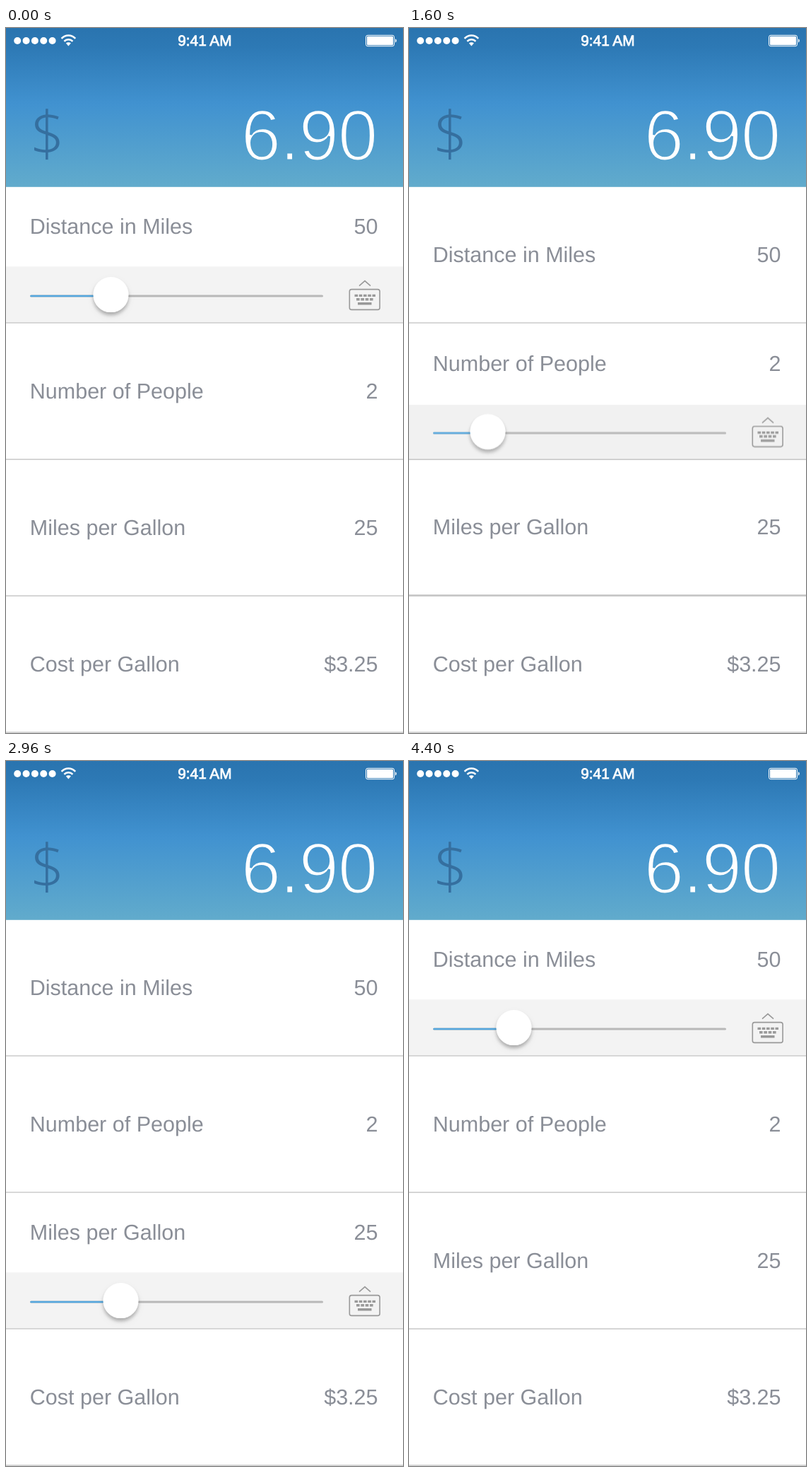
Write an HTML page that moves like this. It is 562 px wide and 997 px high and loops after 4.44 s.

```html
<!DOCTYPE html>
<html lang="en">
<head>
<meta charset="utf-8">
<title>Trip cost calculator</title>
<style>
  html, body { margin: 0; width: 100%; height: 100%; overflow: hidden; background: #fff; }
  svg { display: block; width: 100vw; height: 100vh; }
  text { font-family: "Liberation Sans", Arial, sans-serif; text-rendering: geometricPrecision; }
  .label { font-size: 30.5px; fill: #8a8e97; }
  .end { text-anchor: end; }
  .time { font-size: 20.8px; fill: #fff; stroke: #fff; stroke-width: .8; text-anchor: middle; }
  .total { font-size: 102px; letter-spacing: -1.5px; fill: #fff; stroke: url(#sky); stroke-width: 3; }
  .currency { font-family: "Open Sans", sans-serif; font-weight: 300; font-size: 88px; fill: #356f9f; text-anchor: middle; }
</style>
</head>
<body>
<svg viewBox="0 0 562 997" preserveAspectRatio="none">
  <defs>
    <linearGradient id="sky" gradientUnits="userSpaceOnUse" x1="0" y1="0" x2="0" y2="224">
      <stop offset="0" stop-color="#2a74af"/>
      <stop offset=".12" stop-color="#2d79b5"/>
      <stop offset=".48" stop-color="#4192d0"/>
      <stop offset="1" stop-color="#61abcc"/>
    </linearGradient>
    <filter id="shade" x="-50%" y="-50%" width="200%" height="200%">
      <feDropShadow dx="0" dy="4" stdDeviation="2.5" flood-color="#000" flood-opacity=".26"/>
      <feDropShadow dx="0" dy="4" stdDeviation="5" flood-color="#000" flood-opacity=".06"/>
    </filter>
    <g id="keyboard" fill="none" stroke="#999" stroke-width="1.6">
      <path d="M500 139.8l8-7 8 7"/>
      <rect x="486.3" y="144.8" width="42.8" height="28.8" rx="3"/>
      <g stroke-width="3.4">
        <path d="M493.5 153.6h29.5" stroke-dasharray="4.6 1.65"/>
        <path d="M496 159h23.6" stroke-dasharray="4.6 1.75"/>
        <path d="M498 165h19.5"/>
      </g>
    </g>
  </defs>
  <rect width="562" height="997" fill="#fff"/>
  <g id="rows"></g>
  <rect width="562" height="224.8" fill="url(#sky)"/>
  <g id="signal" fill="#fff"></g>
  <g fill="none" stroke="#fff" stroke-width="2.6">
    <path d="M78.6 14.8a13.4 13.4 0 0 1 19.6 0"/>
    <path d="M82.4 18.8a8.2 8.2 0 0 1 12 0"/>
  </g>
  <path d="M84.9 21.6a5 5 0 0 1 7 0l-3.5 3.9z" fill="#fff"/>
  <text class="time" x="281.4" y="25.4">9:41 AM</text>
  <rect x="509.5" y="10.3" width="40" height="15.4" rx="2.5" fill="none" stroke="#fff"/>
  <rect x="511" y="11.8" width="37" height="12.4" rx="1.2" fill="#fff"/>
  <path d="M551 15.3q1.8 .8 1.8 2.7t-1.8 2.7z" fill="#fff"/>
  <text class="currency" x="58" y="181">$</text>
  <text class="total" x="332.4" y="187">6.90</text>
</svg>
<script>
const LOOP = 4440, STEP = 40, MOVE = 320;
const ROW = 193, TOP = 224.8, PANEL = 80.5, PARALLAX = 24;
const items = [
  ['Distance in Miles', '50', 148.5],
  ['Number of People', '2', 111.5],
  ['Miles per Gallon', '25', 162.5],
  ['Cost per Gallon', '$3.25', 174.8]
];
// Each switch: start, row closing, row opening, time of touch (if it shows).
const switches = [
  [800, 0, 1],
  [1560, 1, 2, 1400],
  [2080, 2, 3, 1960],
  [2640, 3, 2],
  [3320, 2, 1],
  [4040, 1, 0, 3920]
];

document.getElementById('signal').innerHTML =
  [0, 1, 2, 3, 4].map(i => `<circle cx="${16.2 + i * 12.35}" cy="18" r="5"/>`).join('');

document.getElementById('rows').innerHTML = items.map(([name, value, knob], i) => `
  <clipPath id="clip${i}"><rect width="562" height="${ROW}"/></clipPath>
  <g transform="translate(0 ${TOP + i * ROW})" clip-path="url(#clip${i})">
    <rect class="panel" y="100" width="562" height="${ROW - 100}"/>
    <g class="controls">
      <path d="M35.5 154.2H447.5" stroke="#b8b8b8" stroke-width="3" stroke-linecap="round"/>
      <path d="M35.5 154.2H${knob}" stroke="#54a8e0" stroke-width="2.6" stroke-linecap="round"/>
      <circle cx="${knob}" cy="152.3" r="25" fill="#fff" filter="url(#shade)"/>
      <use href="#keyboard"/>
    </g>
    <rect class="cover" width="562" height="${ROW}"/>
    <g class="texts">
      <text class="label" x="33.8" y="106.6">${name}</text>
      <text class="label end" x="526.5" y="106.6">${value}</text>
    </g>
    <path d="M0 ${ROW - 0.75}H562" stroke="#c8c8c8" stroke-width="1.5"/>
  </g>`).join('');

const pick = c => [...document.querySelectorAll('.' + c)];
const panels = pick('panel'), controls = pick('controls');
const covers = pick('cover'), texts = pick('texts');
const clamp = v => Math.min(1, Math.max(0, v));
const grey = v => `rgb(${v},${v},${v})`;

// Ease in and out: cubic Bezier (.42, 0, .58, 1)
function ease(x) {
  if (x <= 0 || x >= 1) return clamp(x);
  let a = 0, b = 1, s;
  for (let i = 0; i < 20; i++) {
    s = (a + b) / 2;
    const u = 1 - s;
    if (1.26 * s * u * u + 1.74 * s * s * u + s * s * s < x) a = s; else b = s;
  }
  return s * s * (3 - 2 * s);
}

function draw(time) {
  const t = Math.floor(time % LOOP / STEP) * STEP;
  const open = [1, 0, 0, 0], touch = [0, 0, 0, 0];
  for (const [start, from, to, tap] of switches) {
    if (t >= start) {
      const p = ease((t - start) / MOVE);
      open[from] = 1 - p;
      open[to] = p;
    } else if (t >= tap) {
      touch[to] = 1 - (t - tap) / (start - tap);
    }
  }
  open.forEach((o, i) => {
    panels[i].setAttribute('fill', grey(Math.round(187 + 56 * o)));
    controls[i].setAttribute('opacity', o);
    controls[i].setAttribute('transform', `translate(0 ${(1 - o) * PARALLAX})`);
    covers[i].setAttribute('height', ROW - PANEL * o);
    covers[i].setAttribute('fill', grey(Math.round(255 - 12 * touch[i])));
    texts[i].setAttribute('transform', `translate(0 ${-o * PANEL / 2})`);
  });
}

const origin = performance.now();
function tick() {
  draw(performance.now() - origin);
  requestAnimationFrame(tick);
}
draw(0);
requestAnimationFrame(tick);
</script>
</body>
</html>
```
